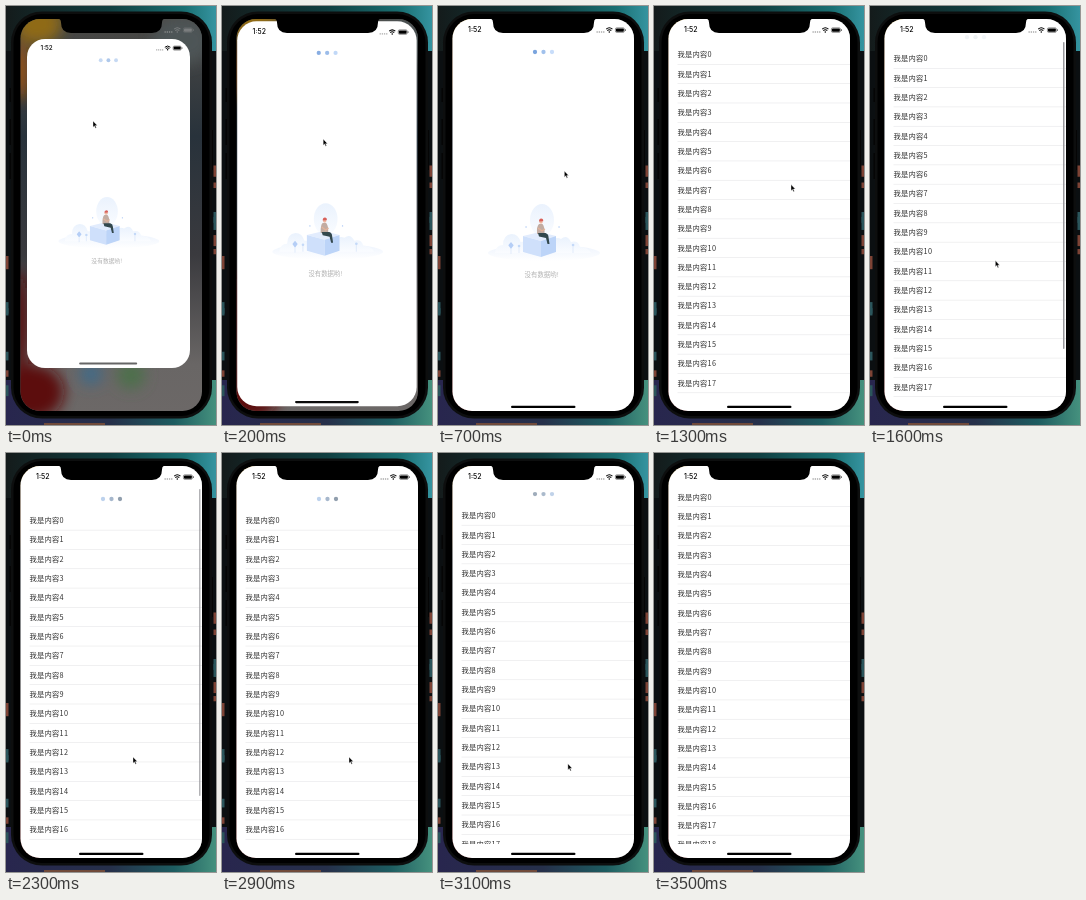
These frames come from a looping animation (210x419 px, 3600 ms). An HTML page:

```html
<!DOCTYPE html>
<html lang="zh">
<head>
<meta charset="utf-8">
<style>
html, body { margin: 0; width: 100%; height: 100%; overflow: hidden; background: #0b0f11; }
svg { display: block; width: 100%; height: 100%; }
text { font-family: "Noto Sans CJK SC", "Noto Sans CJK", sans-serif; }
.time { font: 500 7px Inter, "Liberation Sans", sans-serif; }
</style>
</head>
<body>
<svg viewBox="0 0 210 419" preserveAspectRatio="none">
  <defs>
    <linearGradient id="top">
      <stop offset="0" stop-color="#141b1b"/><stop offset=".5" stop-color="#103f41"/><stop offset=".85" stop-color="#1a7073"/><stop offset="1" stop-color="#3594a0"/>
    </linearGradient>
    <linearGradient id="bottom">
      <stop offset="0" stop-color="#28264e"/><stop offset=".5" stop-color="#26304a"/><stop offset=".8" stop-color="#1d5c60"/><stop offset="1" stop-color="#45917e"/>
    </linearGradient>
    <linearGradient id="wall" x2="0" y2="1">
      <stop offset="0" stop-color="#4c4a46"/><stop offset=".3" stop-color="#28323b"/>
      <stop offset=".6" stop-color="#3a3a3e"/><stop offset=".88" stop-color="#696665"/><stop offset="1" stop-color="#6c6867"/>
    </linearGradient>
    <linearGradient id="ground" x2="0" y2="1">
      <stop offset="0" stop-color="#dce8fb"/><stop offset="1" stop-color="#fff"/>
    </linearGradient>
    <linearGradient id="mist" x2="0" y2="1">
      <stop offset="0" stop-color="#eaf2fd"/><stop offset="1" stop-color="#fafcff"/>
    </linearGradient>
    <filter id="blur" x="-50%" y="-50%" width="200%" height="200%"><feGaussianBlur stdDeviation="7"/></filter>
    <clipPath id="screen"><rect x="14.5" y="13" width="181.5" height="392" rx="19.5"/></clipPath>
    <clipPath id="cardClip"><rect id="card"/></clipPath>
    <clipPath id="tableClip"><rect x="14" y="27" width="183" height="364"/></clipPath>
    <g id="icons">
      <path d="M158.500 26h8" stroke="#aaa" stroke-width="1.300" stroke-dasharray="1.300 .9"/>
      <path d="M168.200 23.200q3.100-2.800 6.200 0M169.300 24.600q2-1.600 4 0" fill="none" stroke="currentColor" stroke-width="1.100"/>
      <circle cx="171.300" cy="26" r=".8" fill="currentColor"/>
      <rect x="177.400" y="21.800" width="9" height="4.600" rx="1.300" fill="none" stroke="currentColor" stroke-width=".4"/>
      <rect x="178" y="22.400" width="7.800" height="3.400" rx=".8" fill="currentColor"/>
      <rect x="187" y="23.300" width=".6" height="1.600" fill="currentColor"/>
    </g>
  </defs>

  <!-- desktop -->
  <rect width="210" height="419" fill="#0b0f11"/>
  <rect width="210" height="45" fill="url(#top)"/>
  <rect y="374" width="210" height="45" fill="url(#bottom)"/>
  <rect x="38" y="417" width="61" height="2" fill="#704a3a"/>
  <g id="specks"></g>

  <!-- phone body -->
  <path d="M3.500 82h3v14h-3zM3.500 113h3v26h-3zM3.500 147h3v26h-3zM204 124h3v40h-3z" fill="#050505"/>
  <rect x="5" y="5.500" width="201" height="407" rx="31" fill="#0d0e0e"/>
  <rect x="7.500" y="8" width="196" height="402" rx="28.500" fill="#000"/>

  <!-- home screen behind the card -->
  <g clip-path="url(#screen)">
    <rect x="14" y="12" width="183" height="394" fill="url(#wall)"/>
    <g filter="url(#blur)">
      <ellipse cx="32" cy="18" rx="24" ry="20" fill="#8f6a14"/>
      <ellipse cx="15" cy="65" rx="7" ry="30" fill="#a4560f"/>
      <ellipse cx="176" cy="35" rx="30" ry="24" fill="#4d5557"/>
      <ellipse cx="14" cy="320" rx="9" ry="55" fill="#540f0f"/>
      <ellipse cx="26" cy="386" rx="32" ry="28" fill="#5c0f0f"/>
      <circle cx="85" cy="368" r="11" fill="#3f6a88"/>
      <circle cx="125" cy="369" r="14" fill="#4d6f4c"/>
    </g>
    <use href="#icons" color="#999" opacity=".6"/>
  </g>

  <!-- app card -->
  <g clip-path="url(#cardClip)">
    <rect x="14" y="12" width="183" height="394" fill="#fff"/>
    <g id="content">
      <g id="empty">
        <ellipse cx="106" cy="247" rx="56" ry="8" fill="url(#ground)" opacity=".5"/>
        <ellipse cx="104" cy="214" rx="12" ry="16" fill="url(#mist)"/>
        <path d="M57 247q1-8 8-8q0-10 8.500-11q7 0 9 8q6-1 8 5v6z" fill="url(#mist)"/>
        <path d="M114 247v-10q3-7 9-4q6-5 10 3q7-2 9 5q8 0 11 6z" fill="url(#mist)"/>
        <path d="M73 236l2.700 3.300l-2.700 3.700l-2.700-3.700z" fill="#b5cef6"/>
        <path d="M73 243v5M81 241v6M135 240v7" stroke="#c8daf6" stroke-width=".5"/>
        <path d="M81 240h.1M135 239h.1" stroke="#c4d9f8" stroke-width="2.600" stroke-linecap="round"/>
        <path d="M88 221h.1M121 221h.1" stroke="#a9c6f4" stroke-width="1.300" stroke-linecap="round"/>
        <path d="M85 230l17-4l16 4l-15 5z" fill="#e2ecfd"/>
        <path d="M85 230l18 5v16l-18-5z" fill="#cfe0fb"/>
        <path d="M118 230l-15 5v16l15-5z" fill="#bcd4f8"/>
        <path d="M99 228q-.5-8 2-10h3.500q2.500 3 2 10z" fill="#c2aca2"/>
        <path d="M100 222l4 3l3-2" fill="none" stroke="#e3b39a" stroke-width="1.200"/>
        <path d="M100 227h7.500q3 1 3 4l1 7h-2l-1.500-6l-7-1.500z" fill="#33484d"/>
        <circle cx="103" cy="216" r="1.700" fill="#efb8a1"/>
        <path d="M101 215.500q0-3 2.200-3q2.300 0 2 2.700z" fill="#d8605a"/>
        <text x="103.700" y="271.300" font-size="6.450" fill="#b0b0b0" text-anchor="middle">没有数据哟!</text>
      </g>
      <g clip-path="url(#tableClip)"><g id="rows"></g></g>
      <g id="dots"></g>
      <rect id="bar" x="193" y="36" width="1.500" height="307" rx=".75" fill="#98989c"/>
    </g>
    <g id="status">
      <text class="time" x="30.100" y="26.400" fill="#000">1:52</text>
      <use href="#icons" color="#000"/>
    </g>
    <rect id="home" x="73" y="399.800" width="64.500" height="2.300" rx="1.150" fill="#000"/>
  </g>

  <path d="M51 12.500q4 0 4 4q0 10.500 10 10.500h81q10 0 10-10.500q0-4 4-4z" fill="#000"/>
  <path id="cursor" d="M0 0v6.200l1.400-1.300l1 2.300l1-.4l-1-2.200h1.900z" fill="#000" stroke="#fff" stroke-width=".4"/>
</svg>
<script>
const LOOP = 3600, STEP = 100;
const ROW = 19.32, FIRST = 34.4;
const HOLD = 23.4, PULL = 33;
const $ = id => document.getElementById(id);
const mix = (a, b, k) => a + (b - a) * k;

function set(el, attrs) {
  for (const key in attrs) el.setAttribute(key, attrs[key]);
  return el;
}
function add(parent, tag, attrs) {
  return parent.appendChild(set(document.createElementNS("http://www.w3.org/2000/svg", tag), attrs));
}

// Progress of t through a span, from 0 to 1
const span = (t, from, to) => Math.min(1, Math.max(0, (t - from) / (to - from)));
const smooth = (...a) => { const k = span(...a); return k * k * (3 - 2 * k); };
const out = (...a) => 1 - (1 - span(...a)) ** 2;

let seed = 7;
const random = () => (seed = seed * 16807 % 2147483647) / 2147483647;
for (let i = 0; i < 12; i++) {
  const left = i % 2 === 0;
  add($("specks"), "rect", {
    x: left ? 0 : 207.5, y: (left ? 250 : 130) + random() * 140,
    width: 2.5, height: 4 + random() * 10, fill: random() < .6 ? "#7d4335" : "#2b555b"
  });
}

for (let i = 0; i < 20; i++) {
  const y = FIRST + i * ROW;
  add($("rows"), "text", { x: 23.4, y: y + 12.3, "font-size": 7.3, "letter-spacing": .25, fill: "#333" }).textContent = "我是内容" + i;
  add($("rows"), "rect", { x: 23.5, y: y + ROW - .3, width: 173, height: .6, fill: "#e6e6e8" });
}
const dots = [0, 1, 2].map(i => add($("dots"), "circle", { cx: 97 + 8.5 * i, cy: 22.6, r: 2.15 }));

const blue = { strong: [122, 164, 222], pale: [200, 221, 250] };
const grey = { strong: [143, 157, 172], pale: [190, 211, 238] };

// The strongest dot swings to and fro, the others pale with distance
function drawDots(t) {
  const again = t >= 1500;
  const swing = Math.cos((t - (again ? 2320 : 700)) / 560 * 2 * Math.PI);
  const peak = again ? 1 + swing : 1 - swing;
  const { strong, pale } = again ? grey : blue;
  dots.forEach((dot, i) => {
    const rgb = strong.map((v, c) => Math.round(mix(v, pale[c], Math.abs(i - peak) / 2)));
    set(dot, { fill: `rgb(${rgb})` });
  });
}

function drawCursor(t) {
  const wander = out(t, 0, 1300), drag = smooth(t, 1350, 1800);
  const rest = smooth(t, 1900, 2300), leave = smooth(t, 3050, 3400);
  const x = 87 + 50 * wander - 20 * drag + 10 * rest + 52 * leave;
  const y = 115 + 63.5 * wander + 130.5 * drag - 5 * rest + 121 * leave;
  set($("cursor"), { transform: `translate(${x} ${y})` });
}

function draw(t) {
  const k = out(t, 0, 300), s = mix(.9, 1, k), cx = mix(101.5, 104.5, k);
  const zoom = (from, to) => `translate(${cx} ${mix(to, from, k)}) scale(${s}) translate(-104.5 ${-from})`;
  set($("card"), { x: mix(21, 14.5, k), y: mix(33, 13, k), width: mix(163, 181.5, k), height: mix(329, 392, k), rx: mix(18, 19.5, k) });
  set($("content"), { transform: zoom(269, 255) });
  set($("status"), { transform: zoom(24, 42) });
  set($("home"), { transform: zoom(401, 357.5), opacity: mix(.6, 1, k) });

  const loaded = t >= 1100;
  set($("empty"), { display: loaded ? "none" : "inline" });
  set($("rows"), { display: loaded ? "inline" : "none" });

  const offset = HOLD * (1 - out(t, 1050, 1500)) + PULL * smooth(t, 1500, 1800)
    - (PULL - HOLD) * smooth(t, 1900, 2200) - HOLD * out(t, 3050, 3500);
  const shift = `translate(0 ${offset})`;
  const fade = mix(.6, 1, k) - smooth(t, 1100, 1300) + smooth(t, 1550, 1750) - smooth(t, 3050, 3300);
  set($("rows"), { transform: shift });
  set($("dots"), { transform: shift, opacity: fade });
  set($("bar"), { opacity: smooth(t, 1500, 1600) - smooth(t, 2200, 2500) });
  drawDots(t);
  drawCursor(t);
}

const start = performance.now();
function tick() {
  const t = (performance.now() - start) % LOOP;
  draw(Math.floor(t / STEP) * STEP);
  requestAnimationFrame(tick);
}
tick();
</script>
</body>
</html>
```
